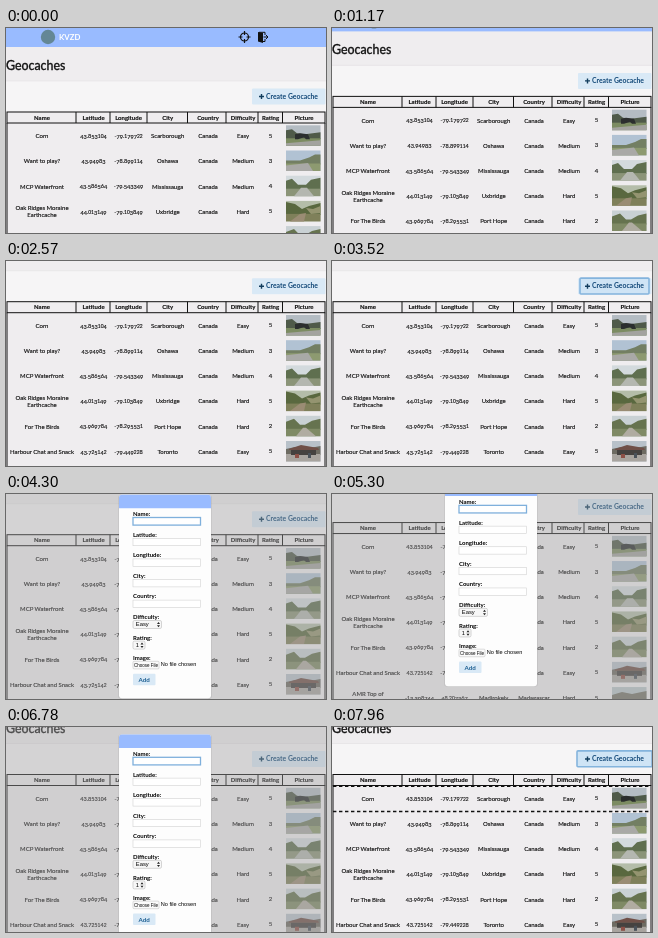
An HTML page that plays this animation: 320x205 px, repeating every 8000 ms.

```html
<!DOCTYPE html>
<html lang="en">
<head>
<meta charset="utf-8">
<title>Geocaches</title>
<style>
  html, body { margin: 0; width: 100%; height: 100%; overflow: hidden; background: #efedef; }
  svg { display: block; width: 100vw; height: 100vh; font-family: Lato, sans-serif; }
  .mid { text-anchor: middle; }
  .cell { font-size: 6px; fill: #111; stroke: #111; stroke-width: .14px; }
  .bold { font-weight: 700; }
  .num { font-size: 5.6px; }
  .sys { font-family: "Liberation Sans", Arial, sans-serif; }
</style>
</head>
<body>
<svg id="stage" viewBox="0 0 320 205">
  <g id="page"></g>
  <rect id="shade" width="320" height="205" fill="#a0a0a0" opacity=".4"/>
  <g id="modal"></g>
</svg>
<script>
const LOOP = 8000;
const ROW_TOP = 95.4, ROW_H = 25.2;
const edges = [1, 70, 104, 141, 181.5, 220, 252, 276.5, 319];
const centers = [36, 87.5, 122.5, 161.7, 202, 237, 264.5, 298];
const heads = ['Name', 'Latitude', 'Longitude', 'City', 'Country', 'Difficulty', 'Rating', 'Picture'];
const caches = [
  ['Corn', '43.853104', '-79.179722', 'Scarborough', 'Canada', 'Easy', '5'],
  ['Want to play?', '43.94983', '-78.899114', 'Oshawa', 'Canada', 'Medium', '3'],
  ['MCP Waterfront', '43.586564', '-79.543349', 'Mississauga', 'Canada', 'Medium', '4'],
  ['Oak Ridges Moraine|Earthcache', '44.013149', '-79.103849', 'Uxbridge', 'Canada', 'Hard', '5'],
  ['For The Birds', '43.969784', '-78.295531', 'Port Hope', 'Canada', 'Hard', '2'],
  ['Harbour Chat and Snack', '43.725142', '-79.449228', 'Toronto', 'Canada', 'Easy', '5'],
  ['AMR Top of|Ambatoloaka', '-13.398744', '48.207367', 'Madirokely', 'Madagascar', 'Hard', '5']
];

const rect = (x, y, w, h, fill, more = '') =>
  `<rect x="${x}" y="${y}" width="${w}" height="${h}" fill="${fill}" ${more}/>`;
const path = (d, fill, more = '') => `<path d="${d}" fill="${fill}" ${more}/>`;
const line = (d, color, width, more = '') =>
  path(d, 'none', `stroke="${color}" stroke-width="${width}" ${more}`);
const text = (x, y, s, cls = '', more = '') => `<text x="${x}" y="${y}" class="${cls}" ${more}>${s}</text>`;

// Old-style figures: 0-2 are small, 3 4 5 7 9 hang below the baseline.
function figures(s) {
  let low = 0;
  return [...s].map(c => {
    const drop = '34579'.includes(c) ? .9 : 0;
    const dy = drop - low;
    low = drop;
    return `<tspan dy="${dy}"${'012'.includes(c) ? ' font-size="4.9"' : ''}>${c}</tspan>`;
  }).join('');
}

// Each scene is drawn in a 34.5 by 20.5 box.
const road = (color, d = 'M0 20.5V16L20 12L34.5 14V20.5Z') => path(d, color);
const land = (sky, trees, grass, treeLine) =>
  rect(0, 0, 34.5, 20.5, sky) + path(`M0 14${treeLine}V14Z`, trees) + rect(0, 13, 34.5, 7.5, grass);
const scenes = [
  land('#b4bcc3', '#4f5a49', '#7c8c62', 'V5L6 4L11 8L19 9L34.5 7') + road('#a3a39f', 'M0 18L34.5 15V20.5H0Z') +
    path('M9 9L14 8L22 9L24 14H20L18 12L12 14H9Z', '#2b2e2e'),
  land('#b1c2d3', '#737f63', '#8d9a70', 'V10L14 10L23 7L29 4L34.5 4') + road('#a9a9a6', 'M0 15L22 12.5L27 20.5H0Z'),
  land('#d3dadd', '#5f6f4f', '#8b9478', 'V5L6 3L12 9L20 9L25 4L34.5 2') + road('#b4b7b0', 'M8 20.5L15 12H21L28 20.5Z'),
  land('#b4bda9', '#59683f', '#7f805a', 'V1L9 3L16 8L23 5L34.5 2') + road('#9a8c74', 'M4 20.5L14 13L20 12L18 20.5Z') +
    path('M20 7L27 8L34.5 5V12L25 13Z', '#949470'),
  land('#c9d1d4', '#66734f', '#7f8a65', 'V6L8 3L14 9L19 9L26 5L34.5 3') + road('#b0aca1', 'M10 20.5L17 12H20L30 20.5Z'),
  land('#b8c1c9', '#6d6b62', '#a8a49f', 'V8L9 6L18 8L34.5 5') + path('M3 8L15 4L32 7L33 9H3Z', '#705048') +
    rect(5, 9, 25, 5, '#454240') + rect(9, 13, 4, 4, '#8c5047') + rect(22, 12, 3, 5, '#4a525a'),
  land('#b9c4c8', '#77766a', '#938b78', 'V8L10 5L20 7L34.5 4') + road('#a3a097')
];

function cacheRow(cells, i) {
  const y = ROW_TOP + ROW_H * i, mid = y + 14.8;
  const out = cells.map((s, c) => {
    if (c === 1 || c === 2) return text(centers[c], mid - .2, figures(s), 'mid cell num');
    if (c === 6) return text(centers[c], mid - .4, s, 'mid cell');
    const parts = s.split('|');
    return parts.map((p, k) =>
      text(centers[c], mid + (k - (parts.length - 1) / 2) * 7, p, 'mid cell')).join('');
  });
  return out.join('') + `<g transform="translate(280 ${y + 1.9})">${scenes[i]}</g>`;
}

function topBar() {
  return rect(0, 0, 320, 19, '#99bbff') +
    '<circle cx="42" cy="9" r="7.2" fill="#648795"/>' +
    text(53, 11.8, 'KVZD', 'bold', 'font-size="7.8" fill="#fff"') +
    '<circle cx="238.5" cy="9" r="4" fill="none" stroke="#111" stroke-width="1.2"/>' +
    line('M238.5 3V7M238.5 11V15M232.5 9H236.5M240.5 9H244.5', '#111', 1.2) +
    path('M252 4L257 5V15L252 13.5Z', '#111') +
    line('M253 4.3H259V7M259 11V13.5H257M257.5 9H262M260 7L262 9L260 11', '#111', 1);
}

function buildPage() {
  const bottom = ROW_TOP + ROW_H * caches.length;
  return rect(0, 0, 320, 290, '#efedef') +
    rect(0, 53, 320, 30.7, '#f6f5f6') + line('M0 53H320', '#e2e0e3', .6) + topBar() +
    text(0, 42, 'Geocaches', '', 'font-size="12.4" fill="#111" stroke="#111" stroke-width=".35"') +
    rect(246, 60.5, 73.5, 16, '#d9e9f6', 'rx="1"') +
    rect(0, 60.4, 0, 15.9, '#cfe4f5', 'id="focus" rx="1" stroke="#84b4dd" stroke-width="1.6"') +
    line('M253 68.5H258M255.5 66V71', '#123d5d', 1.4) +
    text(260, 70.8, 'Create Geocache', 'bold', 'font-size="6.85" fill="#124878"') +
    rect(1, 84, 318, 11, 'none', 'stroke="#111"') +
    line(edges.slice(1, -1).map(x => `M${x} 84V95`).join(''), '#111', 1) +
    heads.map((h, i) => text(centers[i], 91.8, h, 'mid cell bold', 'stroke="none"')).join('') +
    line(`M1 95V${bottom}M319 95V${bottom}`, '#111', 1) +
    caches.map(cacheRow).join('') +
    line('M1 95.9H319M1 121H319', '#111', 1.3, 'id="hover" stroke-dasharray="3.4 2.6"');
}

function select(y, w, value) {
  const x = 127 + w - 3;
  return rect(127, y, w, 8, '#f7f7f7', 'rx="1.5" stroke="#bbb" stroke-width=".6"') +
    text(129.8, y + 6, value, 'sys', 'font-size="5.8"') +
    path(`M${x - 1.5} ${y + 3.4}L${x} ${y + 1.4}L${x + 1.5} ${y + 3.4}ZM${x - 1.5} ${y + 4.8}L${x} ${y + 6.8}L${x + 1.5} ${y + 4.8}Z`, '#222');
}

function buildModal() {
  const label = (s, i) => text(127, 65.4 + 20.6 * i, s + ':', 'bold', 'font-size="6"');
  const labels = ['Name', 'Latitude', 'Longitude', 'City', 'Country', 'Difficulty', 'Rating', 'Image'];
  const inputs = [1, 2, 3, 4].map(i =>
    rect(127, 67 + 20.6 * i, 67.5, 7.4, '#fff', 'stroke="#d2d2d2" stroke-width=".6"')).join('');
  return rect(112, 44, 94, 204.3, '#000', 'rx="3" opacity=".06"') +
    rect(113, 44, 92, 203.6, '#fdfdfd', 'rx="3"') +
    path('M113 57.5V47Q113 44 116 44H202Q205 44 205 47V57.5Z', '#99bbff') +
    labels.map(label).join('') + inputs +
    rect(127, 66.8, 67.5, 7.6, '#fff', 'stroke="#7fb0dc" stroke-width="1.3"') +
    select(169.8, 28.5, 'Easy') + select(190.4, 12, '1') +
    rect(127, 210.6, 26, 7.6, '#fafafa', 'rx="1" stroke="#c4c4c4" stroke-width=".6"') +
    text(140, 216, 'Choose File', 'mid sys', 'font-size="4.5"') +
    text(154.8, 215.8, 'No file chosen', 'sys', 'font-size="5.6"') +
    rect(127, 223, 22.5, 11.5, '#d9e9f6', 'rx="1"') +
    text(138.2, 231, 'Add', 'mid bold', 'font-size="6.2" fill="#1d5f92"');
}

const el = id => document.getElementById(id);
el('page').innerHTML = buildPage();
el('modal').innerHTML = buildModal();
const [page, shade, modal, focus, hover] = ['page', 'shade', 'modal', 'focus', 'hover'].map(el);

function ease(t, from, to) {
  const k = Math.min(1, Math.max(0, (t - from) / (to - from)));
  return k * k * (3 - 2 * k);
}
const show = (node, on) => node.setAttribute('visibility', on ? 'visible' : 'hidden');

function draw(t) {
  const scroll = 43.3 * ease(t, 626, 1968) + 15.7 * ease(t, 5000, 5435) - 22.5 * ease(t, 6200, 6600);
  const shift = `translate(0 ${-scroll.toFixed(2)})`;
  const open = t >= 3650 && t < 7500;
  page.setAttribute('transform', shift);
  modal.setAttribute('transform', shift);
  modal.setAttribute('opacity', ease(t, 3650, 3850));
  show(shade, open);
  show(modal, open);
  // The ring is tight while the button is pressed and wide when focus returns.
  const inset = t < 3650 ? 3 : 0;
  focus.setAttribute('x', 245 + inset);
  focus.setAttribute('width', 75 - 2 * inset);
  show(focus, t >= 3000 && !open);
  show(hover, t >= 7700);
}

function tick(now) {
  draw(now % LOOP);
  requestAnimationFrame(tick);
}
draw(0);
requestAnimationFrame(tick);
</script>
</body>
</html>
```
